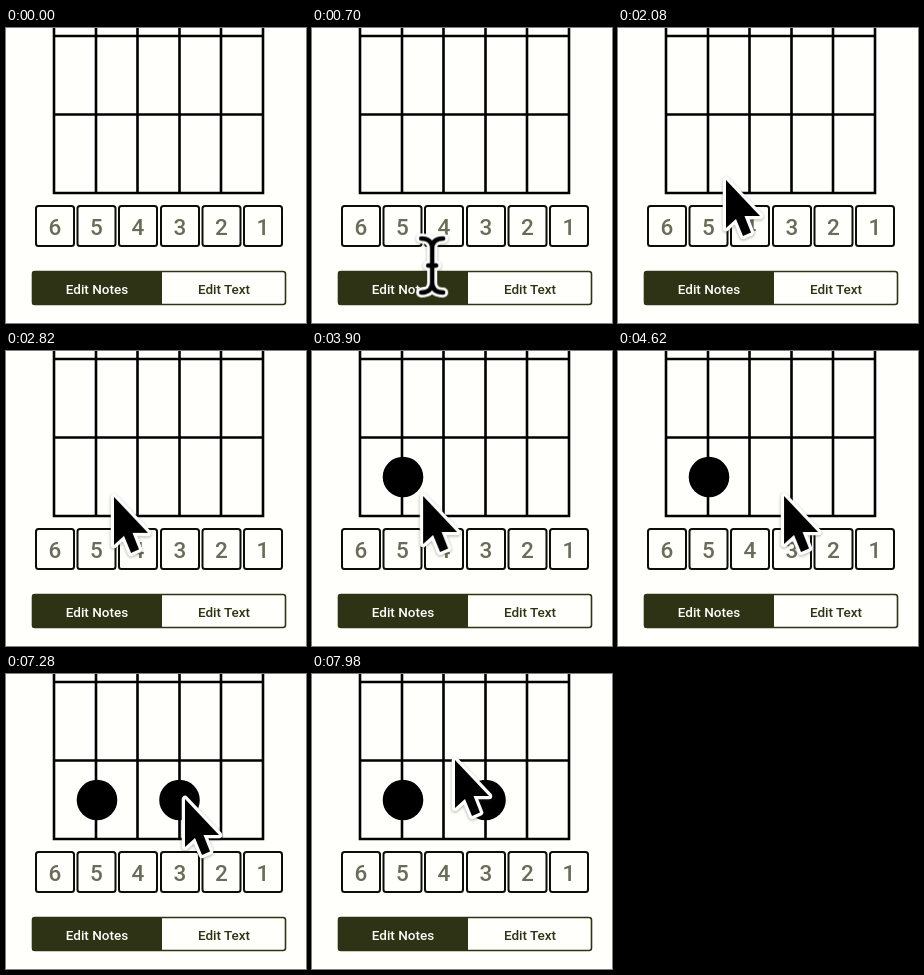
Recreate the animation shown at these times as an HTML page. Size 300 by 295 pixels, loop 8000 ms.

```html
<!DOCTYPE html>
<html lang="en">
<head>
<meta charset="utf-8">
<title>Chord editor</title>
<style>
  html, body { margin: 0; width: 100%; height: 100%; overflow: hidden; background: #fffffb; }
  svg { display: block; width: 300px; height: 295px; }
  text { font-family: Roboto, Lato, sans-serif; font-weight: 500; text-anchor: middle; }
  .grid { fill: none; stroke: #000; stroke-width: 2.6; }
  .field rect { fill: #fffffb; stroke: #0c0c08; stroke-width: 2; }
  .field text { font-size: 22.5px; fill: #6b6b5a; }
  .label { font-size: 13.5px; }

  .cursor, .arrow, .beam, .dot { animation: 8s linear infinite; }
  .cursor { animation-name: move; filter: drop-shadow(0 1.5px 1.5px rgba(50, 50, 30, .4)); }
  .arrow { animation-name: arrow; }
  .beam { animation-name: beam; }
  .dot { animation-timing-function: step-end; }
  .first { animation-name: first; }
  .second { animation-name: second; }
  .arrow path { stroke: #fff; stroke-width: 6.5; stroke-linejoin: round; paint-order: stroke; }
  .beam path { fill: none; stroke: #000; stroke-width: 4.4; stroke-linecap: round; }
  .beam .halo { stroke: #fff; stroke-width: 10; }

  @keyframes move {
    0% { transform: translate(121px, 305px); }
    10.25% { transform: translate(120px, 226px); }
    12.5% { transform: translate(119px, 211px); }
    14.25% { transform: translate(118px, 208px); }
    24.25% { transform: translate(108px, 151px); }
    26% { transform: translate(107px, 149px); }
    33.5% { transform: translate(107px, 143px); }
    44% { transform: translate(107px, 142px); }
    48.75% { transform: translate(110px, 142px); }
    54.5% { transform: translate(152px, 142px); }
    61% { transform: translate(178px, 142px); }
    65% { transform: translate(178px, 142px); }
    69.75% { transform: translate(174px, 137px); }
    75.5% { transform: translate(175px, 128px); }
    81% { transform: translate(181px, 123px); }
    85.75% { transform: translate(182px, 122px); }
    91% { transform: translate(178px, 122px); }
    92.4% { transform: translate(178px, 122px); }
    96.5% { transform: translate(154px, 95px); }
    99.75%, 100% { transform: translate(142px, 83px); }
  }
  @keyframes beam {
    0%, 3.6% { opacity: 0; }
    3.61%, 19.5% { opacity: 1; }
    19.51%, 100% { opacity: 0; }
  }
  @keyframes arrow {
    0%, 3.6% { opacity: 1; }
    3.61%, 19.5% { opacity: 0; }
    19.51%, 100% { opacity: 1; }
  }
  @keyframes first { 0% { opacity: 0; } 39%, 100% { opacity: 1; } }
  @keyframes second { 0% { opacity: 0; } 82%, 100% { opacity: 1; } }
</style>
</head>
<body>
<svg viewBox="0 0 300 295">
  <path class="grid" d="M48 -5V165H257V-5M90 -5V165M131.5 -5V165M173.5 -5V165M215 -5V165M48 8H257M48 86.5H257"/>
  <circle class="dot first" cx="91" cy="126" r="20.3"/>
  <circle class="dot second" cx="173.5" cy="126" r="20.3"/>

  <g class="field"><rect x="30" y="178" width="38" height="40" rx="2.5"/><text x="49" y="207">6</text></g>
  <g class="field"><rect x="71.5" y="178" width="38" height="40" rx="2.5"/><text x="90.5" y="207">5</text></g>
  <g class="field"><rect x="113" y="178" width="38" height="40" rx="2.5"/><text x="132" y="207">4</text></g>
  <g class="field"><rect x="155" y="178" width="38" height="40" rx="2.5"/><text x="174" y="207">3</text></g>
  <g class="field"><rect x="196.5" y="178" width="38" height="40" rx="2.5"/><text x="215.5" y="207">2</text></g>
  <g class="field"><rect x="238" y="178" width="38" height="40" rx="2.5"/><text x="257" y="207">1</text></g>

  <rect x="26.5" y="243.5" width="253" height="33" rx="2.5" fill="#fffffb" stroke="#2d3314" stroke-width="1.6"/>
  <path d="M156 243V277H28.5Q26 277 26 274.5V245.5Q26 243 28.5 243Z" fill="#2d3314"/>
  <text class="label" x="91" y="266" fill="#fffffb">Edit Notes</text>
  <text class="label" x="218" y="266" fill="#2d3314">Edit Text</text>

  <g class="cursor">
    <g class="arrow"><path d="M1 3V51L11 42L18 59L26 55.5L19.5 39H35Z"/></g>
    <g class="beam">
      <path class="halo" d="M-11 -27Q0 -27 0 -17Q0 -27 11 -27M0 -17V17M-11 27Q0 27 0 17Q0 27 11 27M-4 0H4"/>
      <path d="M-11 -27Q0 -27 0 -17Q0 -27 11 -27M0 -17V17M-11 27Q0 27 0 17Q0 27 11 27M-4 0H4"/>
    </g>
  </g>
</svg>
</body>
</html>
```
